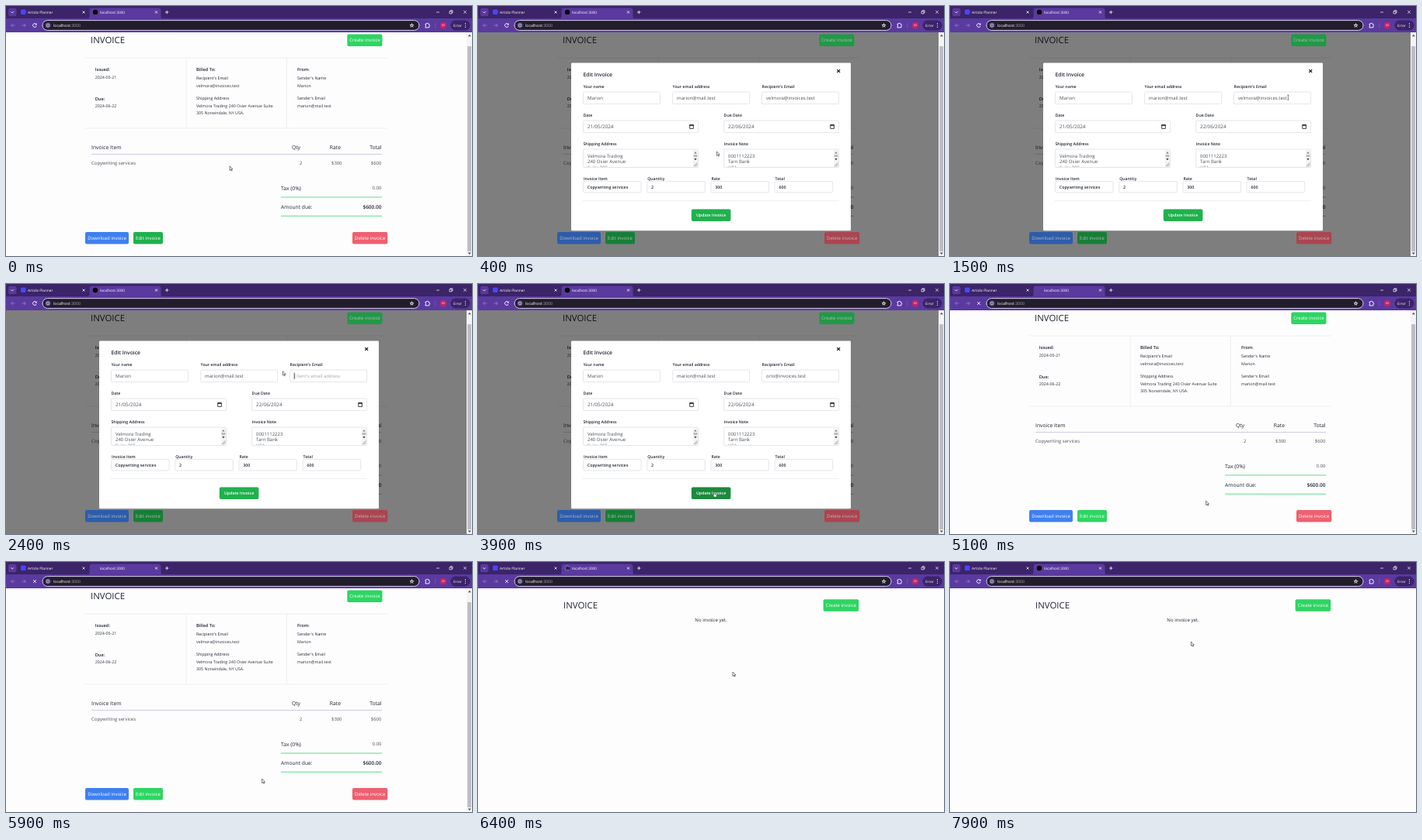
An HTML page that plays this animation: 600 px wide and 323 px high, repeating every 8 s.

```html
<!DOCTYPE html>
<html lang="en">
<head>
<meta charset="utf-8">
<title>Invoice editor</title>
<style>
html, body { margin: 0; width: 100%; height: 100%; overflow: hidden; background: #fdfdfe; }
svg { display: block; }
#stage { width: 100vw; height: 100vh; }
text { font-family: "Open Sans", "Noto Sans", sans-serif; text-rendering: geometricPrecision; white-space: pre; }
</style>
</head>
<body>
<svg id="stage" viewBox="0 0 600 323" preserveAspectRatio="none"></svg>
<script>
const LOOP = 8000, STEP = 100;
const MODAL_OPEN = 400, MODAL_CLOSE = 5100, EMPTY = 6400;
const LOAD_START = 5000, LOAD_END = 7000;
const SELECT = 1500, CLEAR = 2400, TYPE_START = 2500, TYPE_END = 3300;
const PERSON = 'Marion', PERSON_MAIL = 'marion@mail.test';
const OLD_MAIL = 'velmora@invoices.test', NEW_MAIL = 'orlo@invoices.test';
const INK = '#1f2430', SOFT = '#4b5058', RULE = '#e6e8ec';
const GREEN = '#2ed562', GREEN_HOVER = '#1fb14c';

// Markup helpers
const rect = (x, y, w, h, fill, r = 0, more = '') =>
  `<rect x="${x}" y="${y}" width="${w}" height="${h}" fill="${fill}" rx="${r}" ${more}/>`;
const line = (d, stroke, w = 0.8, more = '') =>
  `<path d="${d}" fill="none" stroke="${stroke}" stroke-width="${w}" ${more}/>`;
const fillPath = (d, fill) => `<path d="${d}" fill="${fill}"/>`;
const dot = (x, y, r, fill, more = '') => `<circle cx="${x}" cy="${y}" r="${r}" fill="${fill}" ${more}/>`;
const text = (x, y, s, size = 6, fill = INK, weight = 400, anchor = 'start', more = '') =>
  `<text x="${x}" y="${y}" font-size="${size}" fill="${fill}" font-weight="${weight}" text-anchor="${anchor}" ${more}>${s}</text>`;
const group = (id, body, more = '') => `<g id="${id}" ${more}>${body}</g>`;
const cross = (x, y, r, c, w) => line(`M${x - r} ${y - r}l${2 * r} ${2 * r}m0 ${-2 * r}l${-2 * r} ${2 * r}`, c, w);
const button = (x, y, w, label, fill, id = '') =>
  rect(x, y, w, 15.5, fill, 2, id && `id="${id}"`) + text(x + w / 2, y + 9.9, label, 6, '#fff', 400, 'middle');

function browser() {
  const tabText = (x, s) => text(x, 9.8, s, 4.75, '#fff');
  return rect(0, 0, 600, 17, '#3b2467') + rect(0, 16, 600, 18, '#5a3a9f') +
    rect(3, 2.8, 10.5, 10.4, '#59399c', 2.5) + line('M6.4 7.2l1.8 1.8l1.8-1.8', '#fff') +
    rect(19, 4.5, 6.6, 6.6, '#4945ff', 1.5) + tabText(28, 'Article Planner') + cross(100, 8, 1.5, '#fff', 0.8) +
    fillPath('M104 16.5q3.5 0 3.5-3.5v-7q0-3.5 3.5-3.5h85q3.5 0 3.5 3.5v7q0 3.5 3.5 3.5z', '#5a3a9f') +
    tabText(121, 'localhost:3000') + cross(193.5, 8, 1.5, '#fff', 0.8) +
    dot(115, 8, 3.2, '#050505', 'id="favicon"') +
    group('spinner', dot(115, 8, 3, '#32215a') + line('M115 5a3 3 0 1 1-3 3', '#a99bd2', 0.7)) +
    line('M205 8h4.4m-2.2-2.2v4.4', '#fff') +
    line('M554 8h4M571 6.8h3v3h-3zM572 6.8v-1h3v3h-1', '#fff', 0.7) + cross(591, 7.8, 1.8, '#fff', 0.7) +
    line('M11.6 25h-5m2.3-2.3l-2.3 2.3l2.3 2.3', '#9582c4') + line('M20.4 25h5m-2.3-2.3l2.3 2.3l-2.3 2.3', '#9582c4') +
    group('reload', line('M38.8 23.5a2.4 2.4 0 1 0 .4 2.3', '#fff', 0.9) + fillPath('M39.6 22v2.4h-2.4z', '#fff')) +
    group('stop', cross(37, 25, 1.8, '#fff', 0.9)) +
    rect(47, 18.6, 485, 12.8, '#211d2b', 6.4, 'stroke="#d9d0f2" stroke-width="1"') +
    dot(54, 25, 3.7, '#4a3b78') + dot(54, 25, 2, 'none', 'stroke="#fff" stroke-width=".6"') + line('M54 24.8v1.2M54 23.7v.5', '#fff', 0.6) +
    text(61, 26.9, 'localhost<tspan fill="#aaa5b4">:3000</tspan>', 5.2, '#fff') +
    fillPath('M522.5 22l.9 2l2.1.2l-1.6 1.4l.5 2.1l-1.9-1.1l-1.9 1.1l.5-2.1l-1.6-1.4l2.1-.2z', '#fff') +
    fillPath('M522.5 23.8l.4 1l1 .1l-.8.7l.3 1l-.9-.5l-.9.5l.3-1l-.8-.7l1-.1z', '#211d2b') +
    line('M540 23h1.6a.9 .9 0 0 1 1.8 0h1.4v1.6a.9 .9 0 0 1 0 1.8v1.5h-4.8v-1.6a.8 .8 0 0 0 0-1.6z', '#fff', 0.9) +
    rect(552.6, 21.5, 0.6, 7, '#7e62bd') + dot(563, 25, 4, '#d3205f') + text(563, 26.4, 'M', 3.8, '#fff', 400, 'middle') +
    rect(572.5, 18.5, 25, 13, '#3b2467', 6.5) + text(576, 26.6, 'Error', 4.6, '#fff') +
    [22.7, 25, 27.3].map(y => dot(591.5, y, 0.6, '#fff')).join('');
}

function invoice() {
  const head = (x, y, s) => text(x, y, s, 5.7, INK, 600);
  const sub = (x, y, s) => text(x, y, s, 5.25, INK, 500);
  const small = (x, y, s) => text(x, y, s, 5.3, '#2b303a');
  const col = (x, s) => text(x, 185.4, s, 6.8, INK, 500, 'end');
  const cell = (x, y, s) => text(x, y, s, 5.9, SOFT, 400, 'end');
  return text(109, 48, 'INVOICE', 11.4, INK, 500) +
    line('M102 67H491M102 158H491M232 67V158M361.5 67V158', RULE, 0.7) +
    head(114.7, 83.5, 'Issued:') + small(114.7, 93.5, '2024-05-21') +
    head(114.7, 122, 'Due:') + small(114.7, 130.8, '2024-06-22') +
    head(245, 83.5, 'Billed To:') + sub(245, 95, "Recipient's Email") + small(245, 104.9, OLD_MAIL) +
    sub(245, 121, 'Shipping Address') + small(245, 130.8, 'Velmora Trading 240 Osier Avenue Suite') +
    small(245, 140, '305 Norwindale, NY USA.') +
    head(375, 83.5, 'From:') + sub(375, 95, "Sender's Name") + small(375, 104.9, PERSON) +
    sub(375, 121, "Sender's Email") + small(375, 130.8, PERSON_MAIL) +
    text(110, 185.4, 'Invoice Item', 6.8, INK, 500) + col(379, 'Qty') + col(431, 'Rate') + col(483.5, 'Total') +
    line('M110 191.5H484', '#cbc5dd', 0.9) +
    text(110, 205.3, 'Copywriting services', 6, SOFT) + cell(381.3, 205.3, '2') + cell(432.5, 205.3, '$300') + cell(483.3, 205.3, '$600') +
    text(354, 237.6, 'Tax (0%)', 6.8, INK, 500) + cell(483.5, 237, '0.00') +
    text(354, 262, 'Amount due:', 6.7, INK, 500) + text(483.5, 261.8, '$600.00', 6.5, INK, 600, 'end') +
    line('M354 247H484M354 271.3H484', '#62dc8c', 1);
}

const invoiceButtons = () =>
  button(439.3, 36.5, 45.2, 'Create invoice', GREEN) +
  button(102, 292, 56, 'Download invoice', '#3f80ee') +
  button(164, 292, 38, 'Edit invoice', GREEN, 'edit') +
  button(446, 292, 45.3, 'Delete invoice', '#ee6070');

const scrollbar = () =>
  rect(593, 34, 7, 289, '#f4f4f6') + rect(594.2, 52, 4.8, 265, '#bcbcc2') +
  fillPath('M594.8 39.3l2-2.6l2 2.6z', '#555') + fillPath('M594.8 318.6l2 2.6l2-2.6z', '#555');

function modal() {
  const label = (x, y, s) => text(x, y, s, 5.2, INK, 600);
  const box = (x, y, w, h) => rect(x, y, w, h, '#fff', 1.5, 'stroke="#dcdfe4" stroke-width=".8"');
  const value = (x, y, s) => text(x, y, s, 6, SOFT);
  const date = (x, name, s) => label(x, 143.4, name) + box(x, 148, 148, 15.6) + text(x + 5.5, 158.2, s, 6.3, SOFT) +
    line(`M${x + 137.2} 154h4.6v4.4h-4.6z`, '#111', 0.8) + line(`M${x + 136.8} 153.9h5.4`, '#111', 1.3);
  const area = (x, name, rows) => label(x, 180.4, name) + box(x, 185, 148, 23.5) +
    `<svg x="${x}" y="185.4" width="140" height="22.4">` +
    rows.map((s, i) => value(5.5, 10.2 + 7.9 * i, s)).join('') + '</svg>' +
    rect(x + 141.4, 185.6, 6, 22.3, '#f3f3f4') + fillPath(`M${x + 142.7} 190.4l1.7-2.2l1.7 2.2z`, '#777') +
    rect(x + 142, 192.2, 4.8, 3, '#bbb') + fillPath(`M${x + 142.7} 197l1.7 2.2l1.7-2.2z`, '#333') +
    line(`M${x + 142.3} 207.2l4.6-4.6m-2.4 4.6l2.4-2.4`, '#888', 0.8);
  const item = (x, name, s) => label(x + 0.4, 225, name) + box(x, 226.6, 74.5, 14.4) + text(x + 5.3, 235.9, s, 5.3, INK, 600);
  const top = (x, name, s) => label(x, 106.4, name) + box(x, 111, 99, 15.6) + (s ? value(x + 5.5, 121.2, s) : '');
  return rect(120, 73.6, 360, 216.6, '#fff', 1.2) + text(135.5, 91.3, 'Edit Invoice', 6.75, INK, 600) +
    cross(464.2, 84, 1.9, '#111', 1.2) +
    top(135.5, 'Your name', PERSON) + top(250.6, 'Your email address', PERSON_MAIL) + top(365.6, "Recipient's Email") +
    text(371.1, 121.2, "Client's email address", 5.9, '#a3a6ac', 400, 'start', 'id="hint"') +
    text(371.1, 121.2, '', 6, SOFT, 400, 'start', 'id="mail"') +
    `<clipPath id="selClip">${rect(371, 114, 0, 10, '#000', 0, 'class="sel"')}</clipPath>` +
    group('selection', rect(371, 114, 0, 10, '#0078d7', 0, 'class="sel"') +
      text(371.1, 121.2, OLD_MAIL, 6, '#fff', 400, 'start', 'clip-path="url(#selClip)"')) +
    rect(370.8, 114.6, 0.7, 8.4, '#111', 0, 'id="caret"') +
    date(135.5, 'Date', '21/05/2024') + date(316.6, 'Due Date', '22/06/2024') +
    area(135.5, 'Shipping Address', ['Velmora Trading', '240 Osier Avenue', 'Suite 305']) +
    area(316.6, 'Invoice Note', ['0001112223', 'Tarn Bank', 'USA']) +
    item(135.5, 'Invoice Item', 'Copywriting services') + item(217.8, 'Quantity', '2') +
    item(300, 'Rate', '300') + item(382.2, 'Total', '600') +
    line('M135 251.6H465', RULE, 0.7) +
    rect(274.8, 262.6, 50.6, 15.4, GREEN_HOVER, 2, 'id="update"') + text(300.1, 272.3, 'Update Invoice', 5.3, '#fff', 600, 'middle');
}

const emptyPage = () =>
  text(110, 60, 'INVOICE', 11.4, INK, 500) + button(444.6, 48.3, 45.6, 'Create invoice', GREEN) +
  text(300, 77.4, 'No invoice yet.', 6.05, INK, 400, 'middle');

const pointers = () => group('cursor',
  group('arrow', '<path d="M0 0v5.4l1.3-1.1l.9 1.9l.9-.4l-.9-1.8h1.7z" fill="#fff" stroke="#222" stroke-width=".6"/>') +
  group('beam', line('M-1 -3h2M0 -3v6M-1 3h2', '#333', 0.6)) +
  group('hand', '<path d="M-.6 .4q.6-.8 1.2 0v2.1l2 .5q.6.2.5.9l-.5 2.3h-2.8l-1.9-2.4q.2-.8 1.5 0z" fill="#fff" stroke="#222" stroke-width=".5"/>'));

const $ = id => document.getElementById(id);
$('stage').innerHTML = rect(0, 0, 600, 323, '#fdfdfe') +
  group('invoice', invoice() + rect(0, 34, 600, 289, '#000', 0, 'id="shade" opacity=".5"') +
    group('actions', invoiceButtons()) + scrollbar()) +
  group('empty', emptyPage()) + group('modal', modal()) + browser() + pointers();

// Pointer path: time, x, y
const PATH = [
  [0, 288, 206.8], [300, 288, 206.8], [400, 307.4, 188], [1200, 440, 118.5], [1400, 440, 118.5],
  [2100, 356.3, 112.6], [3300, 356.3, 112.6], [3900, 304.4, 269], [4600, 304.4, 269], [5100, 329.6, 280.2],
  [6000, 329.6, 280.2], [6400, 328, 142], [6800, 312, 104], [7700, 310.4, 103], [LOOP, 310.4, 103]
];

function pointerAt(t) {
  const i = PATH.findIndex(p => p[0] > t);
  const [t0, x0, y0] = PATH[i - 1], [t1, x1, y1] = PATH[i];
  const u = (t - t0) / (t1 - t0), e = u * u * (3 - 2 * u);
  return [x0 + (x1 - x0) * e, y0 + (y1 - y0) * e];
}

const show = (id, on) => { $(id).style.display = on ? '' : 'none'; };
const inside = (x, y, l, t, r, b) => x > l && x < r && y > t && y < b;

function typedMail(t) {
  if (t < CLEAR) return OLD_MAIL;
  const u = Math.min(1, Math.max(0, (t - TYPE_START) / (TYPE_END - TYPE_START)));
  return NEW_MAIL.slice(0, Math.ceil(u * NEW_MAIL.length));
}

function draw(t) {
  const open = t >= MODAL_OPEN && t < MODAL_CLOSE;
  const loading = t >= LOAD_START && t < LOAD_END;
  const [x, y] = pointerAt(t);

  show('invoice', t < EMPTY);
  show('empty', t >= EMPTY);
  show('modal', open);
  show('shade', open);
  $('actions').style.filter = open ? 'brightness(.72)' : 'none';
  $('edit').setAttribute('fill', t < MODAL_CLOSE ? GREEN_HOVER : GREEN);

  show('reload', !loading);
  show('stop', loading);
  show('favicon', !loading);
  show('spinner', loading && t >= EMPTY);
  $('spinner').setAttribute('transform', `rotate(${t * 0.36 % 360} 115 8)`);

  const onUpdate = open && inside(x, y, 274.8, 262.6, 325.4, 278);
  const onMail = open && inside(x, y, 365.6, 111, 464.6, 126.6);
  $('update').setAttribute('fill', onUpdate ? '#1b8b3d' : GREEN_HOVER);
  show('hand', onUpdate);
  show('beam', onMail);
  show('arrow', !onUpdate && !onMail);
  $('cursor').setAttribute('transform', `translate(${x} ${y})`);

  if (!open) return;
  const mail = typedMail(t), node = $('mail');
  node.textContent = mail;
  show('hint', !mail);
  const width = mail ? node.getComputedTextLength() : 0;
  const selecting = t >= SELECT && t < CLEAR;
  show('selection', selecting);
  if (selecting) {
    const left = Math.min(371 + width, Math.max(371, x));
    document.querySelectorAll('.sel').forEach(r => {
      r.setAttribute('x', left);
      r.setAttribute('width', 371 + width - left);
    });
  }
  const idle = Math.max(0, t - TYPE_END);
  show('caret', t >= CLEAR && t < 4100 && Math.floor(idle / 530) % 2 === 0);
  $('caret').setAttribute('x', 370.8 + width);
}

const start = performance.now();
function tick() {
  const t = (performance.now() - start) % LOOP;
  draw(Math.floor(t / STEP) * STEP);
  requestAnimationFrame(tick);
}
tick();
</script>
</body>
</html>
```
